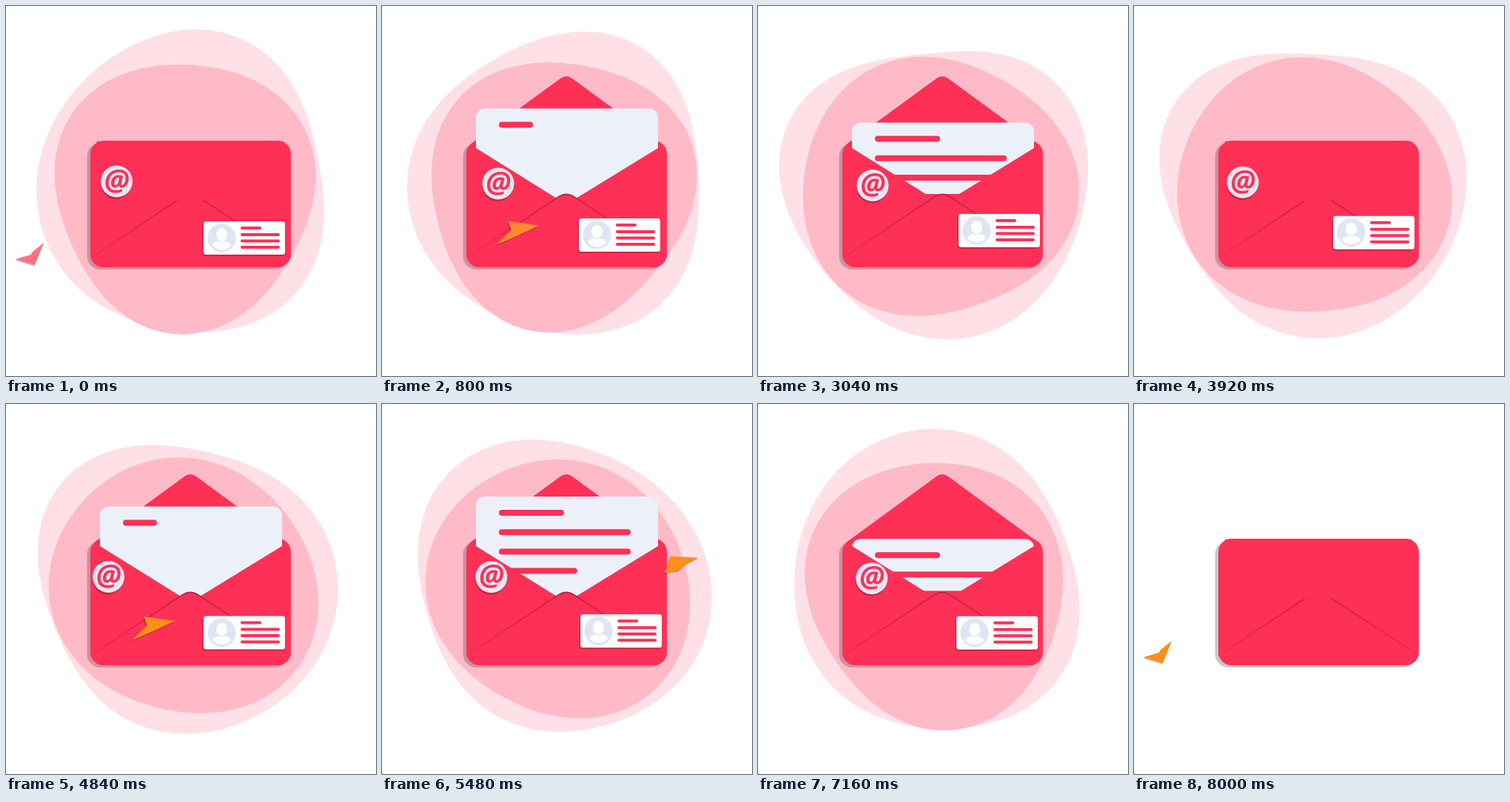
Write an HTML page that moves like this. It is 500 by 500 pixels and loops after 8.04 s.

```html
<!DOCTYPE html>
<html lang="en">
<head>
<meta charset="utf-8">
<title>Mail animation</title>
<style>
  html, body { margin: 0; width: 100%; height: 100%; overflow: hidden; background: #fff; }
  svg { display: block; width: 100%; height: 100%; }
  .at { font: italic 700 39px "Open Sans", "Noto Sans", sans-serif; text-anchor: middle; }
  .round { fill: none; stroke: #ff3056; stroke-linecap: round; }
</style>
</head>
<body>
<svg viewBox="0 0 500 500">
  <g id="blobs">
    <path id="outer" fill="#ffe0e6"/>
    <path id="inner" fill="#ffbac8"/>
  </g>
  <rect x="109.500" y="185" width="271" height="171" rx="18" fill="#000" opacity=".21"/>
  <rect x="114" y="182" width="271" height="171" rx="18" fill="#ff3056"/>
  <g id="flapBack"></g>
  <g id="letter">
    <rect x="127" width="246" height="146" rx="12" fill="#ecf0f9"/>
    <g id="lines" class="round" stroke-width="8"></g>
  </g>
  <path fill="#ff3056" d="M114 200L127 192L249 268L373 192L385 200V335A18 18 0 0 1 367 353H132A18 18 0 0 1 114 335Z"/>
  <path fill="#bd2347" d="M119 337L239 256.500Q249 250.500 259 256.500L381 337Z"/>
  <path fill="#ff3056" d="M119 337.500L239 258.500Q249 252.500 259 258.500L381 337.500L372 345H127Z"/>
  <g id="flapFront"></g>
  <g id="badge">
    <circle cx="-1" cy="3" r="21" fill="#6b0020" opacity=".3"/>
    <circle r="21.500" fill="#e3e7f3"/>
    <text class="at" y="11.500" fill="#ff3056">@</text>
  </g>
  <g id="card">
    <rect x="-1.500" y="1.500" width="110" height="45.500" rx="4" fill="#6b0020" opacity=".3"/>
    <rect width="110" height="45" rx="3.500" fill="#fff"/>
    <circle cx="24.500" cy="22.500" r="19.200" fill="#dfe5f3"/>
    <ellipse cx="24.500" cy="18" rx="7.500" ry="9" fill="#fff"/>
    <path fill="#fff" d="M12 33Q13 28 20 27Q24.500 29 29 27Q36 28 37 33Q24.500 44 12 33Z"/>
    <path class="round" stroke-width="4" d="M52 9H76M52 18H101M52 26.500H101M52 35H101"/>
  </g>
  <g id="bird">
    <polygon id="birdShadow" fill="#000" opacity=".28" transform="translate(-1 1.500)"/>
    <polygon id="birdBody"/>
  </g>
</svg>
<script>
const LOOP = 8040, STEP = 40, END = 8000;
const BIRD_PERIOD = 4000, MAIL_PERIOD = 4040;
const RAD = Math.PI / 180;
const $ = id => document.getElementById(id);
const ramp = (t, start, length) => Math.max(0, Math.min(1, (t - start) / length));
const ease = p => p < .5 ? 4 * p ** 3 : 1 - (2 - 2 * p) ** 3 / 2;
const sine = p => (1 - Math.cos(Math.PI * p)) / 2;
const lerp = (a, b, p) => a + (b - a) * p;
const lerpPoint = (a, b, p) => a.map((v, k) => lerp(v, b[k], p));

// A circle with ripples: lobes around the rim, height, direction, and whether it turns
const ripple = (lobes, height, phase, turns) => ({ lobes, height, phase, turns });
const blobs = {
  outer: {
    radius: 200, center: [242, 244], sway: [-1.5, -2.7], lag: 0,
    ripples: [ripple(2, 4, 83, 0), ripple(2, 6.4, 204, 1),
              ripple(3, 3.5, 225, 0), ripple(3, 8.5, 115, 1), ripple(4, 2, 145, 0)]
  },
  inner: {
    radius: 178.5, center: [240.8, 249.5], sway: [0, 4], lag: 30,
    ripples: [ripple(2, 2.3, 49, 0), ripple(2, 5.5, 196, 1),
              ripple(3, 2.8, 315, 0), ripple(3, 6.5, 265, 1)]
  }
};

function blobPath({ radius, center, sway, lag, ripples }, turn) {
  const n = 72, swing = Math.cos((turn + lag) * RAD);
  const [cx, cy] = center.map((c, k) => c + sway[k] * swing);
  const points = Array.from({ length: n }, (_, i) => {
    const angle = i * 360 / n;
    const r = ripples.reduce(
      (sum, w) => sum + w.height * Math.cos((w.lobes * angle - w.phase - w.turns * turn) * RAD),
      radius + 2.5 * Math.sin(turn * RAD));
    return [cx + r * Math.cos(angle * RAD), cy + r * Math.sin(angle * RAD)];
  });
  return "M" + points.join("L") + "Z";
}

// Waypoints shared in time by the two floating labels
const stops = [0, 800, 2000, 3040, 4840, 6200, END];
const floaters = {
  badge: [[149.5, 237], [157, 240], [158, 241], [155, 242.5], [138.5, 233.5], [159, 234]],
  card: [[267, 291], [266, 287], [272, 285], [271, 281], [267, 286.5], [269.5, 281.5]]
};

function floatAt(route, t) {
  const i = Math.max(0, stops.findLastIndex(s => s <= t)) % route.length;
  return lerpPoint(route[i], route[(i + 1) % route.length],
    sine(ramp(t, stops[i], stops[i + 1] - stops[i])));
}

// Bird corners relative to its beak
const perched = [[-15, 12], [-17, 16], [-38, 22], [-12, 30], [-6, 15]];
const gliding = [[-42, -6], [-38, 6], [-58, 26], [-30, 14], [-15, 7]];
const landing = [[-31, 5], [-51, 27], [-26, 11], [-20, 23], [-17, 10]];
const pose = (a, b, p) => a.map((point, i) => lerpPoint(point, b[i], p));

const svgNode = (name, parent) =>
  parent.appendChild(document.createElementNS("http://www.w3.org/2000/svg", name));

const flaps = ["flapBack", "flapFront"].map(id => {
  const path = svgNode("path", $(id));
  path.setAttribute("d", "M122 185L241 98Q249 92 257 98L376 185Z");
  path.setAttribute("fill", "#ff3056");
  return path;
});
const lines = Array.from({ length: 5 }, (_, i) => ({
  width: i ? 170 : 80, y: 22 + 26.2 * i, start: 610 + 200 * i, node: svgNode("path", $("lines"))
}));

const move = (id, [x, y]) => $(id).setAttribute("transform", `translate(${x} ${y})`);
const show = (node, on) => node.setAttribute("visibility", on ? "visible" : "hidden");

function drawMail(t) {
  const open = ease(ramp(t, 40, 400)) - ease(ramp(t, 3400, 400));
  const scale = 2 * open - 1;
  const up = ease(ramp(t, 414, 600)) - ease(ramp(t, 2754, 600));
  flaps.forEach((flap, i) => {
    flap.setAttribute("transform", `translate(0 184) scale(1 ${scale}) translate(0 -184)`);
    show(flap, (scale > 0) === (i === 0));
  });
  show($("letter"), scale > 0);
  move("letter", [0, 200 - 75 * up]);
  for (const { width, y, start, node } of lines) {
    const p = ramp(t, start, 400);
    node.setAttribute("d", p ? `M162 ${y}h${width * p}` : "");
  }
}

function drawBird(t, warmth) {
  const u = sine(ramp(t, 150, 1850)), drift = Math.max(0, t - 2000);
  const bend = [377, 291];
  const [x, y] = lerpPoint(lerpPoint([51, 320], bend, u), lerpPoint(bend, [469, 165], u), u);
  const beak = [x - .035 * drift, y - .04 * drift];
  const wings = pose(pose(perched, gliding, ramp(t, 150, 650)), landing, ramp(t, 1200, 800));
  const points = [[0, 0], ...wings].map(([dx, dy]) => [beak[0] + dx, beak[1] + dy]).join(" ");
  for (const id of ["birdShadow", "birdBody"]) $(id).setAttribute("points", points);
  $("birdBody").setAttribute("fill",
    `rgb(255,${Math.round(lerp(112, 143, warmth))},${Math.round(lerp(132, 24, warmth))})`);
  $("bird").setAttribute("opacity", 1 - ramp(t, 2250, 250));
}

function draw(t) {
  for (const id of ["blobs", "badge", "card"]) show($(id), t < END);
  for (const id in blobs) $(id).setAttribute("d", blobPath(blobs[id], 360 * t / END));
  for (const id in floaters) move(id, floatAt(floaters[id], t));
  drawMail(t % MAIL_PERIOD);
  drawBird(t % BIRD_PERIOD, ramp(t, 0, 1000));
}

const began = performance.now();
function tick() {
  const t = (performance.now() - began) % LOOP;
  draw(Math.floor(t / STEP) * STEP);
  requestAnimationFrame(tick);
}
tick();
</script>
</body>
</html>
```
